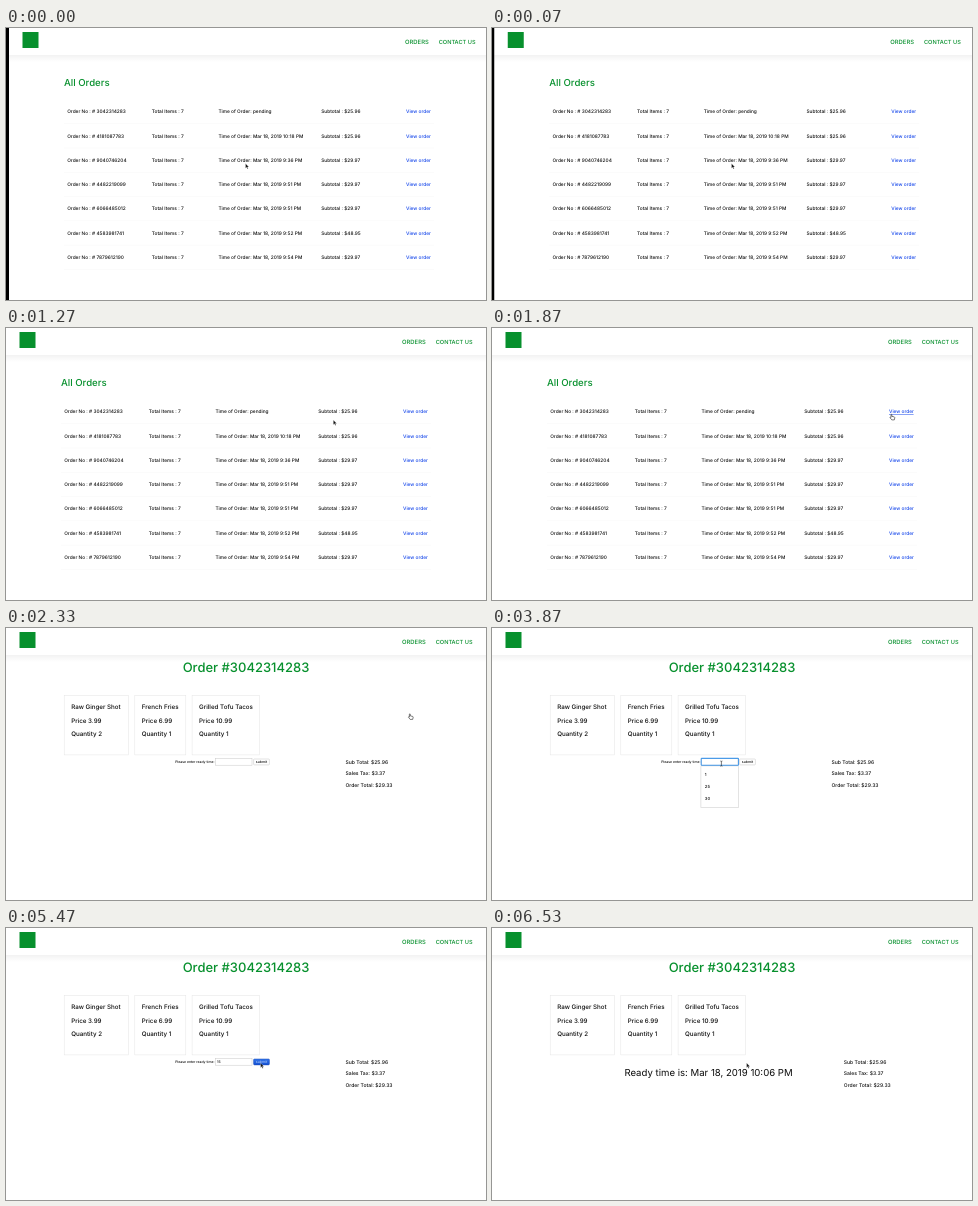
An HTML page that plays this animation: 480 px wide and 272 px high, repeating every 7790 ms.

```html
<!DOCTYPE html>
<html lang="en">
<head>
<meta charset="utf-8">
<title>Orders</title>
<style>
  html, body { margin: 0; width: 100%; height: 100%; overflow: hidden; background: #fff; }
  svg { display: block; width: 480px; height: 272px; font: 500 5px Inter, Roboto, sans-serif; }
  text { white-space: pre; text-rendering: geometricPrecision; }
</style>
</head>
<body>
<svg id="stage" viewBox="0 0 480 272">
  <defs>
    <linearGradient id="shade" x2="0" y2="1">
      <stop stop-color="#000" stop-opacity=".05"/>
      <stop offset="1" stop-color="#000" stop-opacity="0"/>
    </linearGradient>
    <linearGradient id="pressed" x2="0" y2="1">
      <stop stop-color="#3676ea"/>
      <stop offset="1" stop-color="#1450d2"/>
    </linearGradient>
  </defs>
</svg>
<script>
const LOOP = 7790, STEP = 200 / 3;
const GREEN = '#07902d', BLUE = '#1244ea', INK = '#0c0c0c';
const stage = document.getElementById('stage');

function add(parent, tag, attrs, content) {
  const node = document.createElementNS('http://www.w3.org/2000/svg', tag);
  for (const key in attrs) node.setAttribute(key, attrs[key]);
  if (content) node.textContent = content;
  return parent.appendChild(node);
}
const group = parent => add(parent, 'g', {});
const rect = (parent, x, y, width, height, fill, more) =>
  add(parent, 'rect', { x, y, width, height, fill, ...more });
const text = (parent, x, y, size, content, fill = INK, more) =>
  add(parent, 'text', { x, y, 'font-size': size, fill, ...more }, content);
const show = (node, on) => node.setAttribute('display', on ? 'inline' : 'none');

const page = group(stage);

// Header
rect(page, 0, 27, 480, 7, 'url(#shade)');
rect(page, 13.5, 4, 16, 16, GREEN);
text(page, 396, 16, 5.9, 'ORDERS', GREEN);
text(page, 429.7, 16, 5.65, 'CONTACT US', GREEN);

// Order list
const list = group(page);
text(list, 55, 57.5, 9.65, 'All Orders', GREEN);
const orders = [
  ['3042314283', 'pending', '25.96'],
  ['4181087783', '10:18 PM', '25.96'],
  ['9040746204', '9:36 PM', '29.97'],
  ['4482219099', '9:51 PM', '29.97'],
  ['6066485012', '9:51 PM', '29.97'],
  ['4583981741', '9:52 PM', '48.95'],
  ['7879612190', '9:54 PM', '29.97']
];
orders.forEach(([id, time, cost], i) => {
  const y = 85.4 + i * 24.27;
  const when = i ? 'Mar 18, 2019 ' + time : time;
  const cell = (x, s, fill) => text(list, x, y, 4.8, s, fill);
  cell(58.2, 'Order No : # ' + id);
  cell(142.8, 'Total Items : 7');
  cell(209.4, 'Time of Order: ' + when);
  cell(312.2, 'Subtotal : $' + cost);
  cell(397, 'View order', BLUE);
  rect(list, 55, y + 10.1, 370, .5, '#f7f7f7');
});
const underline = rect(list, 397, 86, 24.6, .5, BLUE);

// Order details
const detail = group(page);
text(detail, 240, 44.3, 13, 'Order #3042314283', GREEN, { 'text-anchor': 'middle' });
const items = [
  [58.2, 64.3, 'Raw Ginger Shot', '3.99', 2],
  [128.8, 51, 'French Fries', '6.99', 1],
  [186.1, 67.2, 'Grilled Tofu Tacos', '10.99', 1]
];
for (const [x, w, name, price, count] of items) {
  rect(detail, x, 67.5, w, 59.4, 'none', { stroke: '#e4e4e4', 'stroke-width': .5 });
  [name, 'Price ' + price, 'Quantity ' + count].forEach((s, i) =>
    text(detail, x + 7, 81.3 + i * 13.3, 6.22, s));
}
const totals = group(detail);
['Sub Total: $25.96', 'Sales Tax: $3.37', 'Order Total: $29.33'].forEach((s, i) =>
  text(totals, 339.5, 136 + i * 11.3, 5.05, s));
const ready = text(detail, 132.4, 148.2, 9.6, 'Ready time is: Mar 18, 2019 10:06 PM',
  INK, { 'font-weight': 400 });

// Ready time form
const form = group(detail);
text(form, 169.2, 135.2, 3.4, 'Please enter ready time:');
rect(form, 209.5, 130.6, 36.5, 6.6, '#fff', { stroke: '#c8c8c8', 'stroke-width': .5 });
const ring = rect(form, 209.2, 130.4, 37.3, 7, 'none', { stroke: '#4b9be8', 'stroke-width': 1.1, rx: .6 });
const typed = text(form, 211, 135.3, 3.5, '');
const caret = rect(form, 210.4, 132, .5, 4, INK);
const button = rect(form, 247.6, 131, 15.8, 5.9, '#fff', { stroke: '#c4c4c4', 'stroke-width': .5, rx: .8 });
const label = text(form, 255.5, 135.1, 3.5, 'submit', INK, { 'text-anchor': 'middle' });

// Suggestions
const menu = group(form);
const menuShade = rect(menu, 208.6, 138.4, 38.2, 41.6, '#000', { opacity: .12 });
const menuBox = rect(menu, 209, 138, 37.3, 41.4, '#fff', { stroke: '#d2d2d2', 'stroke-width': .4 });
const choices = ['1', '25', '30'].map((s, i) => text(menu, 212.8, 147.7 + i * 12, 4.2, s));

const edge = rect(stage, 0, 0, 3, 272, '#000');

// Pointers
const pointers = {
  arrow: add(stage, 'path', {
    d: 'M0 0V4.7L1.1 3.7 1.9 5.4 2.7 5 1.9 3.4H3.4Z',
    fill: '#111', stroke: '#fff', 'stroke-width': .3
  }),
  hand: add(stage, 'path', {
    d: 'M1.2 .9C1.2 .1 2.1 .1 2.1 .9V2.4L4.5 2.9 5 3.6 4.5 5.9H2L.2 3.7 .6 3.1 1.2 3.5Z',
    fill: '#fff', stroke: '#111', 'stroke-width': .55, 'stroke-linejoin': 'round'
  }),
  beam: add(stage, 'path', {
    d: 'M-1 -2.6Q0 -2.6 0 -2Q0 -2.6 1 -2.6M0 -2V2M-1 2.6Q0 2.6 0 2Q0 2.6 1 2.6',
    fill: 'none', stroke: '#222', 'stroke-width': .6
  })
};

// Pointer track: step, x, y, shape from that step on
const track = [
  [0, 239.5, 135.6, 'arrow'], [9, 239.5, 135.6, 'arrow'], [10, 245, 124.5, 'arrow'],
  [16, 310, 94, 'arrow'], [18, 310, 94, 'arrow'], [21, 362, 88, 'arrow'],
  [23, 362, 88, 'arrow'], [27, 396, 86.2, 'hand'], [28, 397.8, 86, 'hand'],
  [31, 402.2, 85.5, 'hand'], [41, 402.2, 85.5, 'hand'], [42, 360, 96, 'arrow'],
  [44, 235, 128, 'arrow'], [47, 235, 128, 'arrow'], [48, 231, 133.5, 'beam'],
  [50, 229.4, 135.6, 'beam'], [70, 229.4, 135.6, 'beam'],
  [75, 248, 135.4, 'arrow'], [77, 254.6, 135, 'arrow']
];

function pointerAt(k) {
  let i = track.length - 1;
  while (track[i][0] > k) i--;
  const [t0, x0, y0, shape] = track[i];
  const [t1, x1, y1] = track[i + 1] || [t0 + 1, x0, y0];
  const p = Math.min(1, (k - t0) / (t1 - t0));
  return [x0 + (x1 - x0) * p, y0 + (y1 - y0) * p, shape];
}

function draw(ms) {
  const k = Math.floor((ms + 4) / STEP);
  const within = (from, to) => k >= from && k < to;

  const shift = Math.max(0, 3 - k * .75);
  page.setAttribute('transform', `translate(${shift})`);
  edge.setAttribute('width', shift);

  const opened = k >= 33, sent = k >= 93;
  show(list, !opened);
  show(underline, k >= 27);
  show(detail, opened);
  show(form, !sent);
  show(ready, sent);
  totals.setAttribute('transform', `translate(${sent ? 12.3 : 0})`);

  show(ring, within(48, 80));
  typed.textContent = k >= 66 ? '15' : k >= 64 ? '1' : '';
  show(caret, within(50, 58) || within(64, 72));
  caret.setAttribute('x', k >= 66 ? 214.8 : k >= 64 ? 212.8 : 210.4);

  show(menu, within(50, 66));
  const one = k >= 64;
  menuBox.setAttribute('height', one ? 17.4 : 41.4);
  menuShade.setAttribute('height', one ? 17.6 : 41.6);
  choices.slice(1).forEach(c => show(c, !one));

  const down = k >= 81;
  button.setAttribute('fill', down ? 'url(#pressed)' : '#fff');
  button.setAttribute('stroke', down ? '#1649b8' : '#c4c4c4');
  label.setAttribute('fill', down ? '#a9c4f5' : INK);

  const [x, y, shape] = pointerAt(k);
  for (const name in pointers) show(pointers[name], name === shape);
  pointers[shape].setAttribute('transform', `translate(${x} ${y})`);
}

const start = performance.now();
function tick() {
  draw((performance.now() - start) % LOOP);
  requestAnimationFrame(tick);
}
tick();
</script>
</body>
</html>
```
